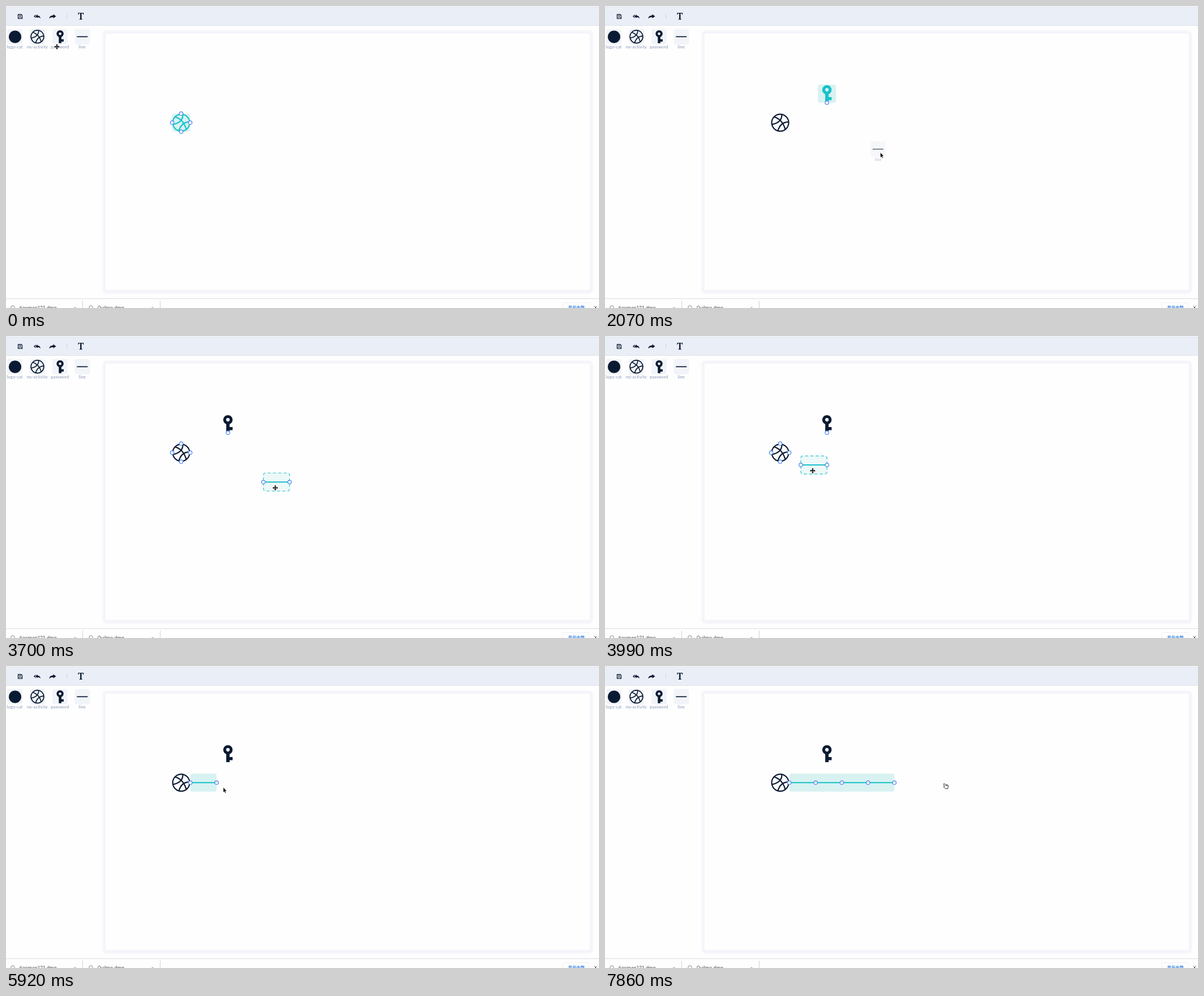
Write an HTML page that moves like this. It is 1048 px wide and 534 px high and loops after 8000 ms.

```html
<!DOCTYPE html>
<html lang="zh">
<head>
<meta charset="utf-8">
<style>
html, body { margin: 0; width: 100%; height: 100%; overflow: hidden; background: #fefefe; }
svg { display: block; }
.label { font: 7.2px Lato, sans-serif; letter-spacing: .3px; fill: #8190b2; text-anchor: middle; }
.file { font: 8.6px Roboto, sans-serif; fill: #4a4d52; }
.dark { color: #0b1a33; }
.teal { color: #17c1c9; }
.anchor { fill: #fff; stroke: #4a82f0; stroke-width: 1.2; }
.selected { fill: #d8f2f1; }
.dragged { fill: #edf8f8; stroke: #2cc5cc; stroke-width: 1.2; stroke-dasharray: 6 4; stroke-dashoffset: 6.3; }
</style>
</head>
<body>
<svg width="1048" height="534" viewBox="0 0 1048 534">
  <defs>
    <g id="ball" fill="none" stroke="currentColor" stroke-width="2.2">
      <circle r="15"/>
      <path d="M3-14.6Q3 0-14.7 3M-11-10.3Q4-6 9 12M-4 14.5Q0-1 15-1.5"/>
    </g>
    <path id="key" fill="currentColor" fill-rule="evenodd"
      d="M-3 .8A8.2 8.2 0 1 1 3 .8V6H8.3V11.4H3V15H-3ZM0-10A3.1 3.1 0 1 0 0-3.8A3.1 3.1 0 1 0 0-10Z"/>
    <path id="dash" d="M-9.5 0H9.5" stroke="currentColor" stroke-width="1.7"/>
    <path id="arrow" d="M0 0V9.2L2 7.3L3.4 10.4L4.9 9.7L3.5 6.7H6.2Z" stroke="#fff" stroke-width=".6"/>
    <path id="move" stroke="#fff" stroke-width="1.2" paint-order="stroke"
      d="M0-4.8L2-2.6H.7V-.7H2.6V-2L4.8 0L2.6 2V.7H.7V2.6H2L0 4.8L-2 2.6H-.7V.7H-2.6V2L-4.8 0L-2.6-2V-.7H-.7V-2.6H-2Z"/>
    <path id="hand" fill="#fff" stroke="#111" stroke-width=".9" stroke-linejoin="round"
      d="M-3.6-4.2Q-2.4-5-1.6-3.6L-.8-2.2L3-2Q4.4-1.6 4.3 0L3.7 3.2V4.5H-.8L-3.6 1.6Q-4.4.4-2.2.5L-3.8-2.8Q-4.3-3.8-3.6-4.2ZM.6-2V0M2.4-2V0"/>
    <filter id="soft" x="-5%" y="-5%" width="110%" height="110%"><feGaussianBlur stdDeviation="1"/></filter>
  </defs>

  <path d="M0 1H1048V35H0Z" fill="#eaeef6"/>
  <path d="M0 1.5H1048M0 34.5H1048" stroke="#dfe3ea"/>
  <g fill="none" stroke="#0b1a33">
    <path d="M21.4 14.9H27L28.7 16.6V22.3H21.4Z" stroke-width="1.1"/>
    <path d="M23.2 15V17.3H26.4V15M23.2 22V19.4H27V22" stroke-width=".9"/>
  </g>
  <g fill="#0b1a33">
    <path d="M49 18.300L52.500 15V16.700L50.900 18.300L52.500 19.900V21.600ZM51.800 18.300L55.800 15V16.900Q60.500 17 61 22Q59 19.800 55.800 19.800V21.600Z"/>
    <path d="M88.500 18.200L83.500 14.600V16.500Q77 16.800 76.300 22.200Q79 19.700 83.500 19.800V21.700Z"/>
  </g>
  <path d="M107.500 14V22" stroke="#cfd5e2"/>
  <text x="132.200" y="23.800" text-anchor="middle" font-family="'Noto Serif', serif" font-weight="700" font-size="15.500" fill="#0b1a33">T</text>

  <g class="dark" id="palette"></g>

  <rect x="170.500" y="43.500" width="867" height="465" rx="7" fill="#f4f5fa" filter="url(#soft)"/>
  <rect x="176" y="49" width="855.500" height="453" fill="#fefefe"/>

  <path d="M0 517.500H1048" stroke="#dcdde0"/>
  <path d="M135.500 521V534M272.500 521V534" stroke="#d0d2d5"/>
  <g fill="none" stroke="#777b80" stroke-width=".9">
    <circle cx="12" cy="533" r="3.200"/><circle cx="150" cy="533" r="3.200"/>
    <path d="M120 534.500L122 532.500L124 534.500M257 534.500L259 532.500L261 534.500"/>
    <path d="M1039.500 530.500L1044.500 535.500M1044.500 530.500L1039.500 535.500" stroke="#44474c"/>
  </g>
  <text class="file" x="24" y="537">tiaoman121.dmg</text>
  <text class="file" x="162" y="537">Quilmo.dmg</text>
  <rect x="984.500" y="524.500" width="46.500" height="20" rx="2" fill="#fefefe" stroke="#eff0f3"/>
  <text x="1008" y="536" text-anchor="middle" font-family="'Noto Sans CJK SC', 'Noto Sans CJK', sans-serif" font-weight="700" font-size="7.200" fill="#1a6fe0">显示全部</text>

  <g id="scene"></g>
</svg>
<script>
const LOOP = 8000, STEPS = 54, SEG = 46.4;
const BALL = [309.6, 206.3], KEY = [392.2, 155], DOCK = [349, 206.3];

// Steps at which the user's actions happen
const LIFT_KEY = 2, DROP_KEY = 5, GRAB_LINE = 10, DROP_LINE = 15,
  DRAG = 25, MAGNET = 27, DOCKED = 34, RELEASE = 36, REACH = 43, STRETCH = 49;

// Cursor stops: step, x, y
const stops = [
  [0, 90, 72], [1, 92, 60], [DROP_KEY, 403, 168], [8, 233, 117], [GRAB_LINE, 139, 60],
  [DROP_LINE, 527, 282], [17, 506, 253], [19, 527, 284], [DRAG - 1, 514, 279], [MAGNET, 367, 238.3],
  [31, 362, 222.3], [DOCKED, 352, 237], [40, 384, 214.6], [46, 374, 212.3],
  [STRETCH - 1, 374, 212.3], [STEPS - 1, 602.3, 212.3]
];

const clamp = v => Math.min(1, Math.max(0, v));
const ease = v => v * v * (3 - 2 * v);
const mix = (a, b, f) => a.map((v, i) => v + (b[i] - v) * f);

function cursorAt(n) {
  const i = Math.max(1, stops.findIndex(s => s[0] >= n));
  const [from, ...a] = stops[i - 1], [to, ...b] = stops[i];
  return mix(a, b, ease((n - from) / (to - from)));
}

// The line hangs on the cursor, then is drawn to its dock beside the ball.
function lineAt(n) {
  const [x, y] = cursorAt(Math.min(RELEASE, Math.max(DRAG - 1, n)));
  return mix([x + 2.2, y - 10.2], DOCK, clamp((n - MAGNET) / 6.5));
}

const $ = id => document.getElementById(id);
const use = (id, x, y, scale = 1, cls = 'dark') =>
  `<use href="#${id}" class="${cls}" transform="translate(${x} ${y}) scale(${scale})"/>`;
const box = (x, y, w, h, attrs) => `<rect x="${x}" y="${y}" width="${w}" height="${h}" rx="4" ${attrs}/>`;
const anchor = (x, y) => `<circle class="anchor" cx="${x}" cy="${y}" r="3.2"/>`;
const tile = (icon, x, name) =>
  box(x - 13.5, 40.7, 27, 27, 'fill="#f1f4f8"') + icon + `<text class="label" x="${x}" y="75.2">${name}</text>`;
const ghost = (content, [x, y], grabX, grabY) =>
  `<g class="dark" opacity=".6" transform="translate(${x - grabX} ${y - grabY})">${content}</g>`;

const keyTile = tile(use('key', 95.6, 54.3, .76), 95.4, 'password');
const lineTile = tile(use('dash', 134.8, 54.3), 135, 'line');
$('palette').innerHTML =
  tile('<circle cx="16" cy="54.500" r="11" fill="#0b1a33"/>', 15.7, 'logo-cat') +
  tile(use('ball', 55.5, 54.3, .76), 55.5, 'no-activity') + keyTile + lineTile;

function item(id, [x, y], selected) {
  return (selected ? box(x - 16, y - 16, 32, 32, 'class="selected"') : '') +
    use(id, x, y, 1, selected ? 'teal' : 'dark');
}

function lineItem([x, y], count, dragging) {
  const left = x - SEG / 2, width = SEG * count;
  let s = box(left, y - 16, width, 32, `pathLength="160" class="${dragging ? 'dragged' : 'selected'}"`) +
    `<path d="M${left} ${y}h${width}" stroke="#17c1c9" stroke-width="2"/>`;
  for (let i = 0; i <= count; i++) s += anchor(left + i * SEG, y);
  return s;
}

function scene(n) {
  const during = (from, to) => n >= from && n < to;
  const cursor = cursorAt(n), hasKey = n >= DROP_KEY, hasLine = n >= DROP_LINE;
  const linking = during(DRAG, DOCKED);

  let s = item('ball', BALL, !hasKey);
  if (hasKey) s += item('key', KEY, !hasLine);
  if (!hasKey || linking)
    for (const d of [-16, 16]) s += anchor(BALL[0] + d, BALL[1]) + anchor(BALL[0], BALL[1] + d);
  if (during(DROP_KEY, DROP_LINE) || linking) s += anchor(KEY[0], KEY[1] + 16);
  if (hasLine) s += lineItem(lineAt(n), Math.max(1, n - STRETCH), during(DRAG, RELEASE));

  if (during(LIFT_KEY, DROP_KEY)) s += ghost(keyTile, cursor, 92, 57);
  if (during(GRAB_LINE + 1, DROP_LINE)) s += ghost(lineTile, cursor, 139, 60);
  const moving = n < LIFT_KEY || n === GRAB_LINE || during(DROP_LINE, RELEASE);
  return s + use(moving ? 'move' : n < REACH ? 'arrow' : 'hand', ...cursor);
}

let shown = -1;
function frame(now) {
  const t = now % LOOP, n = Math.min(STEPS - 1, Math.floor((t + 18) * STEPS / LOOP));
  if (n !== shown) $('scene').innerHTML = scene(shown = n);
  requestAnimationFrame(frame);
}
frame(performance.now());
</script>
</body>
</html>
```
